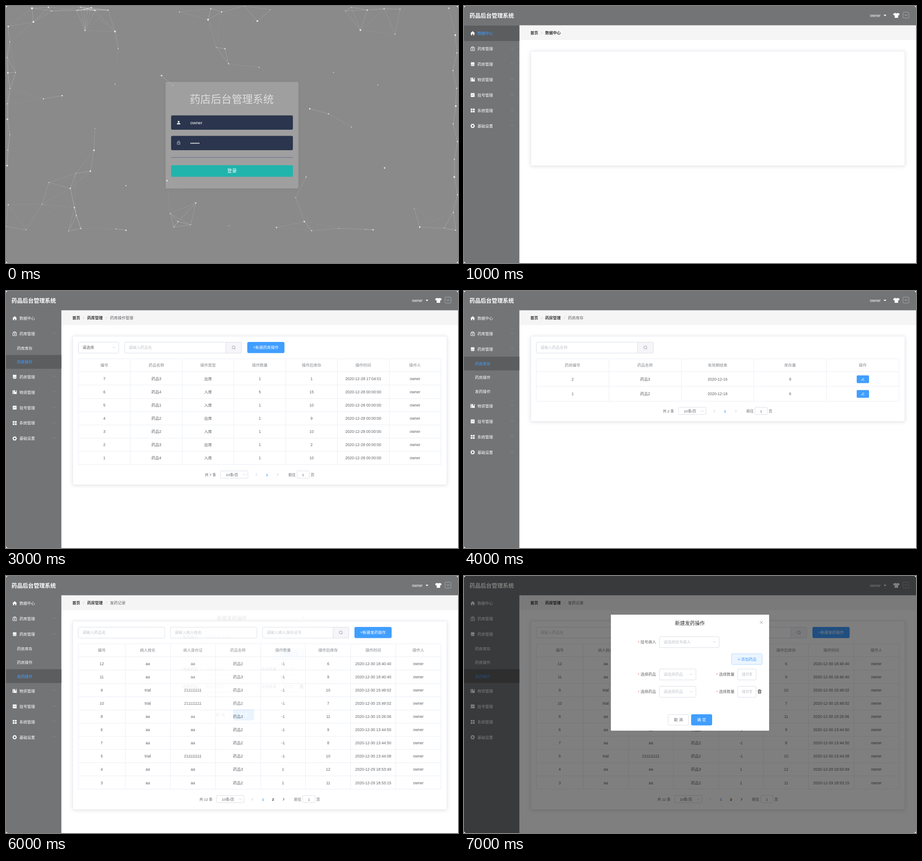
Recreate the animation shown at these times as an HTML page. Size 991 by 565 pixels, loop 8000 ms.

```html
<!DOCTYPE html>
<html lang="zh-CN">
<head>
<meta charset="utf-8">
<title>药品后台管理系统</title>
<style>
  html, body { margin: 0; width: 100%; height: 100%; overflow: hidden; background: #fff; }
  #stage { display: block; width: 991px; height: 565px; border-radius: 5px; overflow: hidden;
    font-family: "Liberation Sans", "Noto Sans CJK SC", sans-serif; }
  #stage text { white-space: pre; }
  .card { filter: drop-shadow(0 1px 4px rgba(0, 0, 0, .12)); }
</style>
</head>
<body>
<svg id="stage" viewBox="0 0 991 565"></svg>
<script>
const USER = 'owner', PATIENT = 'trial';
const BLUE = '#409eff', TEXT = '#606266', HINT = '#c0c4cc', EDGE = '#dcdfe6', RULE = '#ebeef5', BAR = '#737476';
const STEP = 1000;

// Drawing helpers: each returns SVG markup
const rect = (x, y, w, h, fill, stroke = 'none', r = 0, extra = '') =>
  `<rect x="${x}" y="${y}" width="${w}" height="${h}" rx="${r}" fill="${fill}" stroke="${stroke}" ${extra}/>`;
const path = (d, x, y, stroke, fill = 'none', width = 1) =>
  `<path d="${d}" transform="translate(${x} ${y})" fill="${fill}" stroke="${stroke}" stroke-width="${width}"/>`;
const text = (x, y, s, fill = TEXT, anchor = 'start', size = 8.5, weight = 400) =>
  `<text x="${x}" y="${y + size * .37}" fill="${fill}" font-size="${size}" font-weight="${weight}" text-anchor="${anchor}">${s}</text>`;
const mid = (x, y, s, fill, size, weight) => text(x, y, s, fill, 'middle', size, weight);
const line = (x1, y1, x2, y2, stroke, width = 1) => path(`M${x1} ${y1}L${x2} ${y2}`, 0, 0, stroke, 'none', width);
const snap = v => Math.floor(v) + .5;

const DOWN = 'M-3-1.5L0 1.5 3-1.5', UP = 'M-3 1.5L0-1.5 3 1.5';
const LEFT = 'M1.3-2.7L-1.3 0 1.3 2.7', RIGHT = 'M-1.3-2.7L1.3 0-1.3 2.7';
const CROSS = 'M-3-3L3 3M3-3L-3 3';

const field = (x, y, w, hint, chevron = false, color = HINT) =>
  rect(x + .5, y - 11.5, w - 1, 24, '#fff', EDGE, 2.4) +
  `<svg x="${x + 9.5}" y="${y - 10}" width="${w - 19}" height="20">${text(0, 10, hint, color)}</svg>` +
  (chevron ? path(DOWN, x + w - 11, y, HINT, 'none', .8) : '');
const searchBox = (x, y, w, hint) =>
  field(x, y, w, hint) +
  rect(x + w - 35, y - 11.5, 34.5, 24, '#f5f5fa', EDGE, 2) +
  `<circle cx="${x + w - 18}" cy="${y}" r="3.3" fill="none" stroke="#909399" stroke-width=".9"/>` +
  path('M2.4 2.4L4 4', x + w - 18, y, '#909399', 'none', .9);
const button = (x, y, w, label, fill = BLUE, color = '#fff', edge = fill) =>
  rect(x + .5, y - 11.5, w - 1, 23.5, fill, edge, 2.2) + mid(x + w / 2, y, label, color);

// Login screen
const points = [
  57,5, 60,35, 239,56, 443,30, 551,33, 777,53, 193,317, 185,363, 654,474, 907,486,
  341,153, 666,226, 830,356, 353,384, 263,493, 416,433, 805,492, 123,197, 150,443, 971,5,
  141,401, 593,487, 792,9, 93,3, 473,13, 449,6, 480,94, 488,127, 829,6, 82,204,
  164,489, 5,437, 707,237, 658,376, 377,474, 670,494, 173,54, 224,9, 263,395, 154,461,
  0,485, 100,11, 523,0, 380,13, 864,7, 853,62, 246,94, 21,146, 555,135, 757,266,
  718,146, 815,174, 239,172, 94,388, 79,436, 44,492, 241,490, 360,456, 368,486, 405,481,
  489,483, 635,421, 730,489, 788,491, 757,3, 744,11, 580,8, 461,91, 366,175, 195,269,
  153,368, 137,495, 961,488, 895,445
];

function network() {
  const dots = [], reach = 91;
  for (let i = 0; i < points.length; i += 2)
    dots.push([points[i], points[i + 1], 2.3 - 1.6 * Math.sqrt(i / points.length)]);
  for (let i = 0; i < 12; i++)
    dots.push([985 + 5 * Math.sin(i * 2.3), 64 + 39 * i, i % 4 ? 1.2 : 2]);
  for (let i = 0; i < 10; i++)
    dots.push([5 + 3.5 * Math.sin(i * 2), 45 + 34 * i, i % 3 ? 1 : 1.8]);
  for (let i = 0; i < 6; i++)
    dots.push([155 + 8 * i, 6 + 4 * Math.cos(i * 2.6), i > 3 ? 1.6 : .9]);
  let out = '';
  dots.forEach(([x, y, r], i) => {
    out += `<circle cx="${x}" cy="${y}" r="${r}" fill="#fff" opacity=".8"/>`;
    dots.slice(0, i).forEach(([u, v]) => {
      const d = Math.hypot(x - u, y - v);
      if (d < reach) out += line(x, y, u, v, `rgba(255,255,255,${(.55 * (1 - d / reach)).toFixed(2)})`, .6);
    });
  });
  return out;
}

const login = () =>
  rect(0, 0, 991, 565, '#8a8a8a') + network() +
  `<g class="card">${rect(350, 167, 291, 234, 'rgba(255,255,255,.2)', 'none', 3)}</g>` +
  mid(495, 204, '药店后台管理系统', '#dedede', 23) +
  rect(362, 240.5, 267, 31.5, '#2b354d', 'none', 3) +
  rect(362, 285.5, 267, 31.5, '#2b354d', 'none', 3) +
  path('M-3.7 3.7V2.5Q-3.7.6 0 .6T3.7 2.5V3.7ZM-2-2a2 2 0 1 1 4 0a2 2 0 1 1-4 0', 378.5, 256.5, 'none', '#eee') +
  path('M-3-.8h6v4.4h-6zM-1.8-.8v-1.3a1.8 1.8 0 0 1 3.6 0v1.3M0 .7v1.4', 378.5, 300.5, '#ddd', 'none', .8) +
  text(404, 256, USER, '#fff', 'start', 9.7) +
  text(404, 301, '••••••', '#fff', 'start', 9.7) +
  line(362, 333, 629, 333, '#626f92') +
  rect(362, 350, 267, 25.5, '#21b4ac', 'none', 2.5) +
  mid(495.5, 362.5, '登录', '#fff', 10.4);

// Application frame
const menu = [
  ['数据中心', 'M-5 0L0-4.7 5 0H3.7V4.3H1.2V1.3H-1.2V4.3H-3.7V0Z'],
  ['药库管理', '', '药库库存', '药库操作'],
  ['药房管理', 'M-3.8-4.2H3.8V1H-3.8ZM-4.5 1.8H4.5V2.8H3V4.2H-3V2.8H-4.5Z', '药房库存', '药房操作', '发药操作'],
  ['物资管理', 'M-4.5-4.2h2v8.4h-2zM-1.7-4.2H1V0L2.1-1 3.2 0V-4.2H4.5V4.2H-1.7Z'],
  ['挂号管理', 'M-4.2-4.2H4.2V4.2H-4.2Z'],
  ['系统管理', 'M-4.3-4.2h3.7v3.7h-3.7zM.6-4.2h3.7v3.7H.6zM-4.3.6h3.7v3.7h-3.7zM.6.6h3.7v3.7H.6z'],
  ['基础设置', '']
];

function sidebar(active) {
  let y = 43, out = rect(0, 42, 121.4, 523, BAR);
  menu.forEach(([label, icon, ...subs], i) => {
    const open = subs.includes(active), c = y + 17;
    if (label === active) out += rect(0, y, 121.4, 34, '#5c5d5f');
    if (i === 1) out += path('M-4-2.2h8v6.4h-8zM-2.2-2.2v-2h4.4v2M0-.6v3.2M-1.6 1h3.2', 19, c, '#fff');
    else if (i === 6) out += path('M-1.8-3.2H1.8L3.6 0 1.8 3.2H-1.8L-3.6 0Z', 19, c, '#fff', 'none', 2.2);
    else out += path(icon, 19, c, 'none', '#fff');
    if (i === 4) out += path('M-2.7 1.2L-.8-.5.4.6 2.7-1.7', 19, c, BAR);
    out += text(29.5, c, label, label === active ? BLUE : '#fff');
    if (i) out += path(open ? UP : DOWN, 105.5, c - 1, '#909399', 'none', .8);
    y += 33.94;
    if (open) subs.forEach(sub => {
      const on = sub === active;
      if (on) out += rect(0, y - .5, 121.4, 30.3, '#5c5d5f');
      out += text(24, y + 15, sub, on ? BLUE : '#fff');
      y += 30.3;
    });
  });
  return out;
}

const header = () =>
  rect(0, 0, 991, 42.4, BAR) +
  text(12, 21, '药品后台管理系统', '#fff', 'start', 12.2, 700) +
  text(890, 20.5, USER, '#fff', 'start', 8.6) +
  path('M-3.2-1.6H3.2L0 1.8Z', 923, 20.8, 'none', '#fff') +
  path('M-3-5.5Q0-3 3-5.5L7.2-3 5.6.5 3.8-.4V5.5H-3.8V-.4L-5.6.5-7.2-3Z', 948, 20.5, 'none', '#fff') +
  rect(962.5, 13.5, 13, 13, 'none', '#a6a7a9', 1) + path(DOWN, 969, 20, '#ddd', 'none', .8);

function crumbs(names) {
  const xs = [145.5, 178, 228];
  return rect(121.4, 42.4, 870, 32.6, '#f5f5f5') + names.map((name, i) => {
    const last = i === 2;
    return text(xs[i], 59, name, last ? TEXT : '#303133', 'start', 8.5, last ? 400 : 700) +
      (i ? path(RIGHT, xs[i] - 7.7, 59, HINT, 'none', .8) : '');
  }).join('');
}

const page = (active, names, bottom, content) =>
  rect(0, 0, 991, 565, '#fff') + crumbs(names) + sidebar(active) + header() +
  `<g class="card">${rect(146.5, 99.5, 820, bottom - 99.5, '#fff', RULE, 2)}</g>` + content;

function table(heads, rows, { rowH = 29.1, first = 0, hover = -1, edit = false } = {}) {
  const left = 158.5, right = 953.5, top = 149.5, body = 178.2;
  const bottom = body + rows.length * rowH;
  const w = (right - left - first) / heads.length;
  const edge = i => i ? left + first + i * w : left;
  const center = i => (edge(i) + edge(i + 1)) / 2;
  let out = hover < 0 ? '' : rect(left, body + hover * rowH, right - left, rowH, '#f5f5fa');
  for (let i = 0; i <= heads.length; i++) out += line(snap(edge(i)), top, snap(edge(i)), bottom, RULE);
  out += line(left, top - .5, right, top - .5, RULE);
  for (let i = 0; i <= rows.length; i++) {
    const y = snap(body + i * rowH - .3);
    out += line(left, y, right, y, RULE);
  }
  heads.forEach((h, i) => out += mid(center(i), 163.3, h, '#84878d'));
  rows.forEach((row, r) => {
    const y = body + (r + .5) * rowH - .2;
    row.split('|').forEach((cell, i) => out += mid(center(i), y, cell));
    if (edit) out += rect(861, y - 8.5, 27, 17, BLUE, 'none', 2) +
      path('M-2.6 1.4L1-2.6 2.3-1.4-1.2 2.4-2.8 2.7ZM.5 2.8H3.2', 874.5, y, '#fff', 'none', .8);
  });
  return out + pager(bottom + 21.7, rows.length);
}

function pager(y, count) {
  const two = count === 10, a = two ? -8.8 : 0, b = two ? 12.6 : 0;
  const small = (x, s, color, weight) => mid(x, y, s, color, 7.9, weight);
  return text(two ? 424 : 436, y, `共 ${two ? 12 : count} 条`, TEXT, 'start', 7.9) +
    rect(470.5 + a, snap(y - 8.5), 60, 16, '#fff', EDGE, 2) + small(495.5 + a, '10条/页') +
    path(DOWN, 522.5 + a, y, HINT, 'none', .8) +
    path(LEFT, 549 + a, y, HINT) + small(572.3 + a, '1', BLUE, 700) +
    (two ? small(585.5, '2', '#303133', 700) : '') +
    path(RIGHT, 596 + b, y, two ? '#303133' : HINT) +
    text(619 + b, y + .3, '前往', TEXT, 'start', 7.9) +
    rect(638 + b, snap(y - 8.5), 27, 16, '#fff', EDGE, 2) + small(651.5 + b, '1') +
    text(668 + b, y + .3, '页', TEXT, 'start', 7.9);
}

// Pages
const dataPage = () => page('数据中心', ['首页', '数据中心'], 351, '');

const stockPage = (kind, rows, bottom, hover) =>
  page(kind + '库存', ['首页', kind + '管理', kind + '库存'], bottom,
    searchBox(158, 124, 257.5, '请输入药品名称') +
    table([kind + '编号', '药品名称', '有效期结束', '库存量', '操作'], rows, { rowH: 32.1, hover, edit: true }));

const operationPage = (kind, rows, bottom) =>
  page(kind + '操作', ['首页', kind + '管理', kind + '操作管理'], bottom,
    field(158, 124, 89.5, '请选择', true, TEXT) +
    searchBox(259.5, 124, 257.5, '请输入药品名') +
    button(529, 124, 81.5, `+新建${kind}操作`) +
    table(['编号', '药品名称', '操作类型', '操作数量', '操作后库存', '操作时间', '操作人'],
      rows.map(r => `${r}|${USER}`), { first: 1 }));

const twin = 'aa|aa', other = PATIENT + '|211111111';
const dispensed = [
  `12|${twin}|药品2|-1|6|2020-12-30 18:40:40`, `11|${twin}|药品3|-1|9|2020-12-30 18:40:40`,
  `9|${other}|药品3|-1|10|2020-12-30 15:49:02`, `10|${other}|药品2|-1|7|2020-12-30 15:49:02`,
  `8|${twin}|药品3|-1|11|2020-12-30 15:26:06`, `6|${twin}|药品2|-1|9|2020-12-30 13:44:50`,
  `7|${twin}|药品2|-1|8|2020-12-30 13:44:50`, `5|${other}|药品2|-1|10|2020-12-30 13:44:08`,
  `4|${twin}|药品3|1|12|2020-12-29 18:53:49`, `3|${twin}|药品2|1|11|2020-12-29 18:53:15`
];
const dispensePage = () =>
  page('发药操作', ['首页', '药房管理', '发药记录'], 513.5,
    field(158, 124, 190.5, '请输入药品名') + field(360, 124, 190.5, '请输入病人姓名') +
    searchBox(562, 124, 190, '请输入病人身份证号') + button(764, 124, 81.5, '+新建发药操作') +
    table(['编号', '病人姓名', '病人身份证', '药品名称', '操作数量', '操作后库存', '操作时间', '操作人'],
      dispensed.map(r => `${r}|${USER}`), { first: 4 }));

// Dialogs
const shade = () => rect(0, 0, 991, 565, 'rgba(0,0,0,.5)');
const label = (right, y, s) => text(right, y, s, TEXT, 'end') + text(right - 40, y + 1, '*', '#f56c6c');
const dialog = (x, w, h, title, content) =>
  rect(x, 85, w, h, '#fff', 'none', 1) + mid(495.3, 104, title, '#303133', 10.9) +
  path(CROSS, x + w - 17, 102, '#909399', 'none', .9) + content +
  button(447, 61 + h - 9 + .0 + 0 + 0 + 0 + 9, 46, '取 消', '#fff', TEXT, EDGE) +
  button(498, 61 + h, 46, '确 定');

const stockDialog = () => dialog(372, 247, 221, '新建药库操作',
  label(428, 145, '选择药品') + field(435, 145, 132, '请选择药品', true) +
  label(428, 182, '操作类型') + field(435, 182, 132, '请选择操作类型', true) +
  label(428, 220, '操作数量') + field(435, 220, 169, '请输入操作数量'));

const dispenseDialog = () => dialog(322, 347, 255, '新建发药操作',
  label(421, 145, '挂号病人') + field(428, 145, 132, '请选择挂号病人', true) +
  button(586, 182.5, 68, '＋添加药品', '#ecf5ff', BLUE, '#b3d8ff') +
  [216, 254].map(y =>
    label(421, y, '选择药品') + field(428, y, 81, '请选择药品', true) +
    label(593, y, '选择数量') + field(599.5, y, 41.5, '操作数量')).join('') +
  path('M-3.8-2.8H3.8M-1.3-3V-4H1.3V-3M-2.8-2.8V3.8H2.8V-2.8M-1-1V2.3M1-1V2.3', 648, 254, '#303133'));

const scenes = [
  login(),
  dataPage(),
  stockPage('药库', ['6|药品3|2020-12-16|1', '5|药品4|2020-12-09|15', '4|药品1|2020-12-16|10', '3|药品2|2020-12-09|9'], 351, 2),
  operationPage('药库', [
    '7|药品3|出库|1|1|2020-12-28 17:04:01', '6|药品4|入库|5|15|2020-12-28 00:00:00',
    '5|药品1|入库|1|10|2020-12-28 00:00:00', '4|药品2|出库|1|9|2020-12-28 00:00:00',
    '3|药品2|入库|1|10|2020-12-28 00:00:00', '2|药品3|出库|1|2|2020-12-28 00:00:00',
    '1|药品4|入库|1|10|2020-12-28 00:00:00'], 426),
  stockPage('药房', ['2|药品3|2020-12-16|9', '1|药品2|2020-12-18|6'], 286.5),
  operationPage('药房', [
    '5|药品2|出库|1|8|2020-12-28 17:04:01', '1|药品2|入库|1|10|2020-12-28 00:00:00',
    '2|药品3|入库|1|10|2020-12-28 00:00:00', '3|药品2|出库|1|9|2020-12-28 00:00:00',
    '4|药品3|入库|1|11|2020-12-28 00:00:00'], 367.5) + shade() + stockDialog(),
  dispensePage() + `<g opacity=".11" transform="translate(0 -11)">${dispenseDialog()}</g>`,
  dispensePage() + shade() + dispenseDialog()
];

const stage = document.getElementById('stage');
stage.innerHTML = scenes.map((s, i) => `<g display="${i ? 'none' : 'inline'}">${s}</g>`).join('');
const layers = [...stage.children];
let start;
function tick(now) {
  start ??= now;
  const current = Math.floor((now - start) / STEP) % layers.length;
  layers.forEach((g, i) => g.setAttribute('display', i === current ? 'inline' : 'none'));
  requestAnimationFrame(tick);
}
requestAnimationFrame(tick);
</script>
</body>
</html>
```
